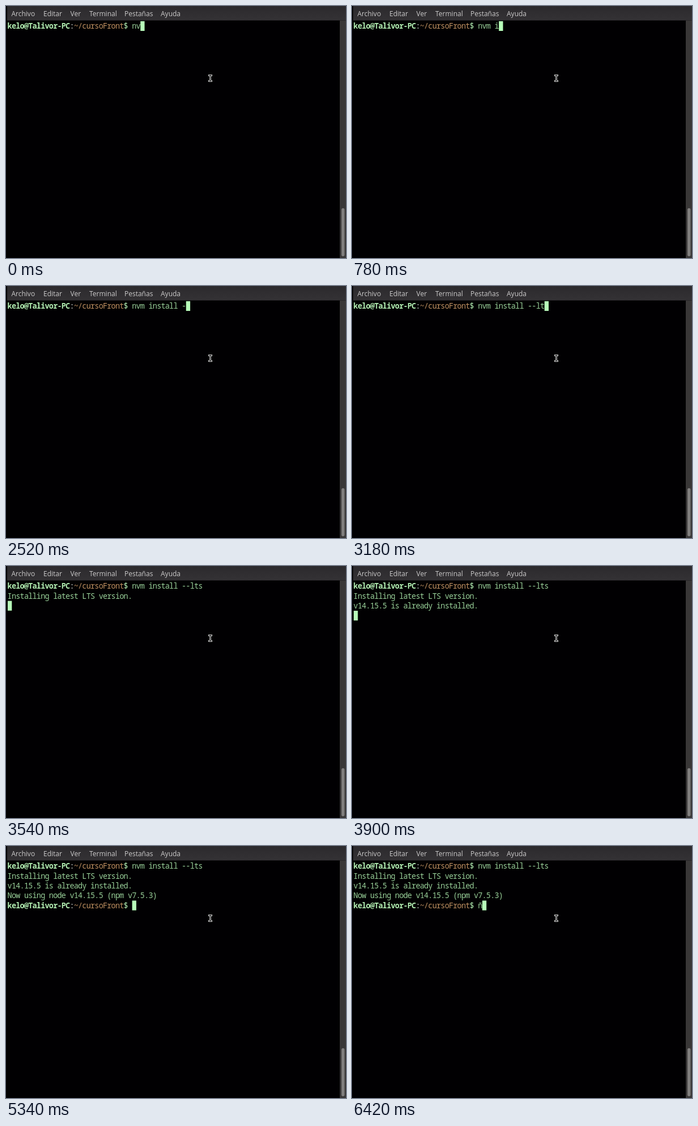
Write an HTML page with a canvas that moves like this. It is 600 px wide and 445 px high and loops after 6.48 s.

```html
<!DOCTYPE html>
<html lang="es">
<head>
<meta charset="utf-8">
<title>Terminal</title>
<style>
  html, body { margin: 0; width: 100%; height: 100%; overflow: hidden; background: #000; }
  canvas { display: block; width: 600px; height: 445px; }
</style>
</head>
<body>
<canvas id="stage" width="600" height="445"></canvas>
<script>
const ctx = document.getElementById('stage').getContext('2d');
const LOOP = 6480;
const CELL = 7.32, ROW = 17.4, LEFT = 3, TOP = 26.8;
const MONO = '13.5px "Noto Sans Mono", "DejaVu Sans Mono", monospace';
const GREEN = '#98cf98', BRIGHT = '#b3efb2', ORANGE = '#be8f60', CURSOR = '#b7ffb9';

const PROMPT = [
  ['kelo@Talivor-PC', BRIGHT, '600'],
  [':', '#d6d8d4', '500'],
  ['~/cursoFront', ORANGE, '500'],
  ['$ ', BRIGHT, '500']
];

// Times at which each key of the command lands; the first two are already there.
const COMMAND = 'nvm install --lts';
const KEYS = [0, 0, 60, 180, 420, 840, 900, 1020, 1140, 1200, 1320,
              2040, 2400, 2640, 3120, 3180, 3240];
const ENTER = 3360;
const OUTPUT = [
  [3420, 'Installing latest LTS version.'],
  [3840, 'v14.15.5 is already installed.'],
  [4140, 'Now using node v14.15.5 (npm v7.5.3)']
];
const READY = 4200, LAST_KEY = 6240;

const MENU = [['Archivo', 9.5], ['Editar', 66], ['Ver', 113.5],
              ['Terminal', 147], ['Pestañas', 209], ['Ayuda', 273]];

function rect(color, x, y, w, h) {
  ctx.fillStyle = color;
  ctx.fillRect(x, y, w, h);
}

// Writes on the terminal grid and returns the next free column.
function write(text, col, row, color = GREEN, weight = '400') {
  ctx.font = weight + ' ' + MONO;
  ctx.fillStyle = color;
  ctx.textAlign = 'center';
  for (const ch of text) {
    if (ch !== ' ') ctx.fillText(ch, LEFT + (col + 0.5) * CELL, TOP + row * ROW + 13.3);
    col++;
  }
  return col;
}

function prompt(row) {
  let col = 0;
  for (const [text, color, weight] of PROMPT) col = write(text, col, row, color, weight);
  return col;
}

function session(t) {
  const typed = KEYS.filter(k => t >= k).length;
  let row = 0;
  let col = write(COMMAND.slice(0, typed), prompt(0), 0);
  if (t >= ENTER) {
    row = 1;
    col = 0;
    for (const [at, line] of OUTPUT) {
      if (t >= at) write(line, 0, row++);
    }
  }
  if (t >= READY) {
    col = prompt(row);
    if (t >= LAST_KEY) col = write('ñ', col, row);
  }
  rect(CURSOR, LEFT + col * CELL, TOP + row * ROW, 7.3, 17.2);
}

function menuBar() {
  const shade = ctx.createLinearGradient(0, 0, 0, 26);
  shade.addColorStop(0, '#2c2a2d');
  shade.addColorStop(1, '#343235');
  rect(shade, 2, 0, 598, 25.5);
  ctx.font = '500 12px "Open Sans", "Noto Sans", sans-serif';
  ctx.textAlign = 'left';
  ctx.fillStyle = '#cbcaca';
  for (const [label, x] of MENU) ctx.fillText(label, x, 17.6);
}

function scrollBar() {
  rect('#393737', 589, 25.5, 11, 419.5);
  ctx.fillStyle = '#807e7d';
  ctx.beginPath();
  ctx.roundRect(592, 357, 5.5, 85, 2.7);
  ctx.fill();
}

function beam(color, width) {
  ctx.strokeStyle = color;
  ctx.lineWidth = width;
  ctx.lineCap = 'square';
  ctx.beginPath();
  ctx.moveTo(358.5, 122.5);
  ctx.lineTo(362.5, 122.5);
  ctx.moveTo(360.5, 122.5);
  ctx.lineTo(360.5, 132.5);
  ctx.moveTo(358.5, 132.5);
  ctx.lineTo(362.5, 132.5);
  ctx.stroke();
}

function draw(now) {
  rect('#010002', 0, 0, 600, 445);
  menuBar();
  scrollBar();
  session(now % LOOP);
  beam('#cccccc', 3);
  beam('#101010', 1);
}

const start = performance.now();
function frame() {
  draw(performance.now() - start);
  requestAnimationFrame(frame);
}
frame();
</script>
</body>
</html>
```
